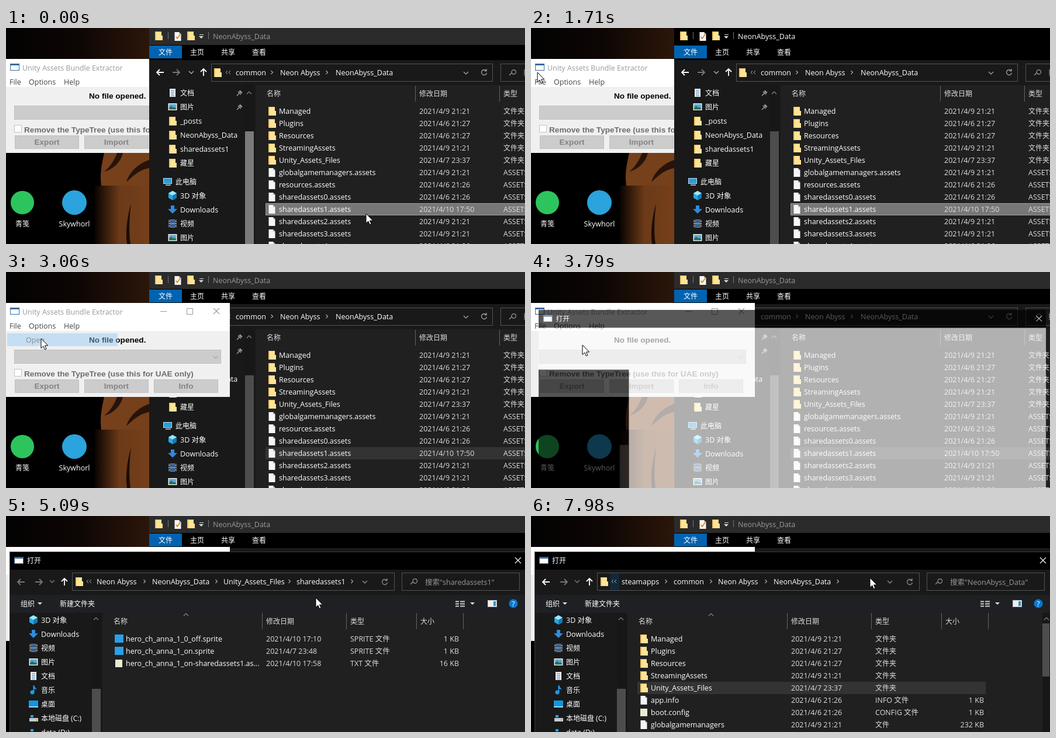
Animation of 888 by 370 pixels, one loop 8 s. Source, as an HTML page:

```html
<!DOCTYPE html>
<html lang="zh">
<head>
<meta charset="utf-8">
<title>Opening an asset folder</title>
<style>
html, body { margin: 0; width: 100%; height: 100%; overflow: hidden; background: #000; }
svg { display: block; width: 100%; height: 100%; }
text { font: 12.5px "Open Sans", "Noto Sans CJK SC", "Noto Sans CJK", sans-serif; white-space: pre; }
.han { font-size: 12px; }
.bold { font: bold 13.6px "Liberation Sans", sans-serif; }
.line { fill: none; stroke: currentColor; }
</style>
</head>
<body>
<svg id="stage" viewBox="0 0 888 370" preserveAspectRatio="xMinYMin meet"></svg>
<script>
const rect = (x, y, w, h, fill, more = '') =>
  `<rect x="${x}" y="${y}" width="${w}" height="${h}" fill="${fill}" ${more}/>`;
const frame = (x, y, w, h, fill, stroke) => rect(x + .5, y + .5, w - 1, h - 1, fill, `stroke="${stroke}"`);
const text = (x, y, s, fill = '#fff', more = '') =>
  `<text x="${x}" y="${y + 4.5}" fill="${fill}" ${/^[\u4e00-\u9fff]/.test(s) ? 'class="han"' : ''} ${more}>${s}</text>`;
const middle = 'text-anchor="middle"', end = 'text-anchor="end"';
const icon = (id, x, y, color = '#fff') => `<use href="#${id}" x="${x}" y="${y}" color="${color}"/>`;
const group = (id, body, more = '') => `<g id="${id}" ${more}>${body}</g>`;
const def = (id, body) => group(id, body);
const stroke = (d, w = 1.2) => `<path class="line" stroke-width="${w}" d="${d}"/>`;
const shape = (d, fill) => `<path fill="${fill}" d="${d}"/>`;

const defs = `<defs>
  <linearGradient id="glow"><stop offset="0" stop-color="#030202"/><stop offset=".5" stop-color="#0d0604"/><stop offset="1" stop-color="#2c160a"/></linearGradient>
  <linearGradient id="ember"><stop offset="0" stop-color="#080402"/><stop offset=".15" stop-color="#2a1509"/><stop offset=".45" stop-color="#6b3a18"/><stop offset="1" stop-color="#753f1a"/></linearGradient>
  <clipPath id="leftPart"><rect width="245" height="370"/></clipPath>
  <clipPath id="field"><rect x="114" y="97" width="466" height="31"/></clipPath>` +
  def('folder', shape('M-6-7H5V0H7V8H-6z', '#f0c560') + shape('M-4-6H5V0H7V8H-4z', '#ffe397')) +
  def('page', shape('M-5.5-7H2L5.5-3.5V8h-11z', '#f5f5f5') + shape('M2-7v3.5h3.5z', '#aaa')) +
  def('doc', shape('M-5-7H5V7H-5z', '#eee') + `<g color="#3a87c4">${stroke('M-3-4H3M-3-1H3M-3 2H3M-3 5H3')}</g>`) +
  def('note', rect(-6, -6, 12, 13, '#e9ecd2')) +
  def('tile', rect(-7, -7, 15, 14, '#2b9fe6')) +
  def('picture', rect(-7.5, -6, 15, 12, '#eee') + rect(-6, -4.5, 12, 9, '#56a9dc') + shape('M-6 4.5v-3l4-3 3 3 2-1 3 2v2z', '#2c6d50')) +
  def('cube', shape('M0-8L7-4V4L0 8-7 4v-8z', '#29a9dd') + shape('M0-8L7-4 0 0-7-4z', '#9be6fa') + shape('M0 0L7-4V4L0 8z', '#1678b5')) +
  def('down', shape('M-3-7h6v6h5L0 7-8-1h5z', '#2d8ae0')) +
  def('film', rect(-7, -7, 14, 14, '#888') + rect(-4, -6, 8, 5, '#345f91') + rect(-4, 1, 8, 5, '#345f91') +
    '<path d="M-5.5-7V7M5.5-7V7" stroke="#222" stroke-width="2" stroke-dasharray="2"/>') +
  def('music', '<circle cx="-2" cy="4" r="3.5" fill="#1e9be8"/>' + shape('M-.5-8h2c0 4 4 4 4 9-1-3-3-3-4-3V4h-2z', '#1e9be8')) +
  def('desk', rect(-8, -6, 16, 12, '#1296e0') + rect(-8, 4, 16, 2, '#9cd8f8')) +
  def('drive', rect(-7, 0, 15, 6, '#c9c9c9') + rect(-5, -5, 5, 4, '#25a5e8') + rect(4, 3, 2, 1, '#2c2')) +
  def('pc', rect(-8, -6, 15, 10, '#bcdcec') + rect(-7, -5, 13, 8, '#2c9bd8') + rect(-4, 5, 9, 2, '#aaa')) +
  def('app', rect(-8, -6, 16, 12, '#3b6a9d') + rect(-7, -3, 14, 8, '#fff')) +
  def('check', icon('page', 0, 0) + `<g color="#e08a18">${stroke('M-3 1L-1 4 4-3', 1.8)}</g>`) +
  def('back', stroke('M6 0H-6M-1-5L-6 0-1 5', 1.8)) +
  def('forward', stroke('M-6 0H6M1-5L6 0 1 5', 1.8)) +
  def('up', stroke('M0 6V-5M-5-1L0-6 5-1', 1.8)) +
  def('chevron', stroke('M-1.5-3L1.5 0-1.5 3')) +
  def('more', stroke('M-1-3L-4 0-1 3M4-3L1 0 4 3', 1)) +
  def('drop', stroke('M-4-2L0 2 4-2', 1.5)) +
  def('rise', stroke('M-4 2L0-2 4 2')) +
  def('triangle', shape('M-4-2H4L0 2z', '#ddd')) +
  def('reload', stroke('M3.5-3A4.5 4.5 0 1 0 4.5 1M4-6v3.5H.5', 1.4)) +
  def('lens', stroke('M-1 1L-5 5M-1-1A3.8 3.8 0 1 1 0 2 3.8 3.8 0 0 1-1-1')) +
  def('pin', stroke('M-5 5L-1 1M-3-2L2 3M-1-3L3 1M0-4L4 0', 1.6)) +
  def('close', stroke('M-5-5L5 5M5-5L-5 5', 1.1)) + '</defs>';

const desktop = rect(0, 0, 888, 370, '#000') + rect(0, 0, 245, 54, 'url(#glow)') +
  shape('M163 270C160 250 164 232 168 214H245V270z', '#75401a') +
  shape('M190 214C184 230 176 240 168 246 184 242 196 230 200 214zM245 226C226 232 210 248 206 264 220 250 232 242 245 240z', '#27130a') +
  rect(152, 270, 93, 100, 'url(#ember)') +
  shape('M207 370C204 350 207 325 214 300 211 325 210 350 213 370z', '#1c0d06') +
  '<circle cx="28" cy="299" r="20" fill="#2dc45e"/><circle cx="117" cy="299" r="21" fill="#2ba3dc"/>' +
  text(28, 335, '青笺', '#fff', middle) + text(117, 335, 'Skywhorl', '#fff', middle);

const rowTop = i => 132 + 21 * i;
const folders = [['Managed', '9 21:21'], ['Plugins', '6 21:27'], ['Resources', '6 21:27'],
  ['StreamingAssets', '9 21:21'], ['Unity_Assets_Files', '7 23:37']];
const assets = [['globalgamemanagers', '9 21:21'], ['resources', '6 21:26'], ['sharedassets0', '6 21:26'],
  ['sharedassets1', '10 17:50'], ['sharedassets2', '9 21:21'], ['sharedassets3', '9 21:21'], ['sharedassets4', '6 21:26']];
const explorerRows = [
  ...folders.map(([name, day]) => ['folder', name, day, '文件夹']),
  ...assets.map(([name, day]) => ['page', name + '.assets', day, 'ASSETS 文件'])
].map(([kind, name, day, type], i) => {
  const y = 142 + 21 * i;
  return icon(kind, 455, y) + text(467, y, name) + text(707, y, '2021/4/' + day, '#ddd') + text(851, y, type, '#ddd');
}).join('');

const places = ['cube|3D 对象', 'down|Downloads', 'film|视频', 'picture|图片', 'doc|文档', 'music|音乐',
  'desk|桌面', 'drive|本地磁盘 (C:)', 'drive|data (D:)'].map(s => s.split('|'));
const tree = (list, x, y0) => list.map(([kind, name], i) =>
  icon(kind, x, y0 + 24 * i) + text(x + 13, y0 + 24 * i, name)).join('');
const quick = [['doc', '文档'], ['picture', '图片'], ['folder', '_posts'], ['folder', 'NeonAbyss_Data'],
  ['folder', 'sharedassets1'], ['folder', '藏星']];

const crumbs = (y, list) => list.map(([x, name, arrow]) =>
  text(x, y, name) + (arrow ? icon('chevron', arrow, y, '#aaa') : '')).join('');

const explorer = rect(245, 0, 643, 370, '#191919') + rect(245, 0, 643, 29, '#2b2b2b', 'id="caption"') +
  icon('folder', 261, 13) + rect(277, 7, 1, 12, '#777') + icon('check', 294, 14) + icon('folder', 316, 13) +
  icon('triangle', 334, 16) + rect(331, 11, 7, 1, '#ddd') + rect(346, 7, 1, 12, '#777') +
  text(354, 14, 'NeonAbyss_Data', '#999', 'id="captionText"') +
  rect(245, 29, 643, 26, '#000') + rect(245, 30, 56, 22, '#0063b1') +
  text(261, 41, '文件') + text(315, 41, '主页') + text(368, 41, '共享') + text(421, 41, '查看') +
  icon('back', 264, 76) + icon('forward', 291, 76, '#777') + icon('drop', 317, 76, '#aaa') + icon('up', 338, 76) +
  frame(351, 61, 482, 31, '#191919', '#535353') +
  icon('folder', 362, 76) + icon('more', 380, 76, '#aaa') +
  crumbs(76, [[393, 'common', 455], [469, 'Neon Abyss', 549], [564, 'NeonAbyss_Data']]) +
  icon('drop', 787, 77, '#999') + icon('reload', 818, 76, '#999') +
  frame(846, 61, 60, 31, '#191919', '#535353') + icon('lens', 866, 76, '#999') + text(885, 76, '搜', '#999') +
  tree(quick, 285, 111) + icon('pin', 400, 111, '#999') + icon('pin', 400, 135, '#999') +
  icon('pc', 277, 263) + text(290, 263, '此电脑') + tree(places.slice(0, 4), 285, 287) +
  rect(408, 98, 17, 272, '#171717') + icon('rise', 416, 111, '#888') +
  rect(409, 177, 15, 193, '#4d4d4d') + rect(409, 177, 15, 193, '#7a7a7a', 'id="thumbGlow"') +
  rect(427, 98, 461, 272, '#202020') + text(446, 112, '名称', '#ddd') + text(707, 112, '修改日期', '#ddd') +
  text(851, 112, '类型', '#ddd') + rect(700, 99, 1, 27, '#636363') + rect(844, 99, 1, 27, '#636363') +
  rect(444, 0, 444, 21, '#4d4d4d', 'id="hover"') +
  rect(444.5, 300.5, 450, 20, '#777', 'id="selected"') + explorerRows;

const button = (x, name) => frame(x, 184, 110, 23, '#ccc', '#bfbfbf') + text(x + 55, 195, name, '#838383', `class="bold" ${middle}`);
const extractor = rect(0, 53, 383, 161, '#f0f0f0') + rect(0, 53, 383, 48, '#fff') +
  icon('app', 15, 67) + text(28, 68, 'Unity Assets Bundle Extractor', '#999', 'id="appTitle"') +
  group('appButtons', stroke('M264 67.5h11M309.5 62.5h10v10h-10z', 1) + icon('close', 360, 67, 'currentColor')) +
  rect(2, 83, 28, 18, '#cce8ff', 'id="fileMark"') +
  text(6, 92, 'File', '#444') + text(39, 92, 'Options', '#444') + text(99, 92, 'Help', '#444') +
  text(142, 116, 'No file opened.', '#000', 'class="bold"') +
  frame(14, 133, 354, 24, '#ccc', '#bfbfbf') + icon('drop', 359, 146, '#aaa') +
  frame(14, 166, 13, 13, '#fff', '#c4c4c4') +
  text(31, 174, 'Remove the TypeTree (use this for UAE only)', '#6d6d6d', 'class="bold"') +
  button(15, 'Export') + button(134, 'Import') + button(253, 'Info');

const commands = ['Save', 'Close', 'Load Package file', 'Create Package file', 'Create Installer', 'Exit'];
const menu = group('menu', frame(0, 102, 193, 160, '#f2f2f2', '#ccc') + text(34, 116, 'Open', '#111') +
  commands.map((name, i) => text(34, 138 + 22 * i, name, '#111')).join('')) +
  group('openItem', rect(2, 105, 189, 22, '#91c9f7') + text(34, 116, 'Open', '#111'));

const fileRow = ([kind, name, day, type, size], i) => {
  const y = 210 + 21 * i;
  return icon(kind, 193, y) + text(205, y, name) + text(445, y, '2021/4/' + day, '#ddd') +
    text(589, y, type, '#ddd') + (size ? text(775, y, size + ' KB', '#ddd', end) : '');
};
const sprites = [['tile', 'hero_ch_anna_1_0_off.sprite', '10 17:10', 'SPRITE 文件', 1],
  ['tile', 'hero_ch_anna_1_on.sprite', '7 23:48', 'SPRITE 文件', 1],
  ['note', 'hero_ch_anna_1_on-sharedassets1.as...', '10 17:58', 'TXT 文件', 16]];
const dataRows = [...folders.map(([name, day]) => ['folder', name, day, '文件夹']),
  ['page', 'app.info', '6 21:26', 'INFO 文件', 1], ['note', 'boot.config', '6 21:26', 'CONFIG 文件', 1],
  ['page', 'globalgamemanagers', '9 21:21', '文件', 232]];
const dataPath = 'G:\\Steam\\steamapps\\common\\Neon Abyss\\NeonAbyss_Data';

const titleBar = rect(6, 61, 882, 31, '#000') + icon('app', 22, 76) + text(36, 76, '打开') + icon('close', 876, 76);
const ghost = group('ghost', rect(6, 92, 882, 400, '#fff') + rect(6, 165, 157, 330, '#000') +
  rect(147, 296, 15, 200, '#333') + titleBar);

const dialog = group('dialog', rect(6, 61, 882, 309, '#191919') + titleBar +
  icon('back', 26, 113, '#777') + group('backReady', icon('back', 26, 113)) + icon('forward', 56, 113, '#777') +
  icon('drop', 79, 112, '#777') + icon('up', 100, 113) +
  rect(7, 135, 881, 31, '#1f2023') + frame(824, 144, 16, 12, '#eee', '#bbb') + rect(834, 146, 4, 8, '#2c91d4') +
  '<circle cx="868" cy="150" r="7.5" fill="#0a78d0"/>' + text(868, 150, '?', '#fff', 'text-anchor="middle" font-weight="bold"') +
  rect(165, 166, 723, 204, '#202020') + icon('rise', 308, 169, '#888') +
  text(184, 180, '名称', '#ddd') + text(445, 180, '修改日期', '#ddd') + text(589, 180, '类型', '#ddd') + text(709, 180, '大小', '#ddd') +
  [438, 582, 702, 782].map(x => rect(x, 166, 1, 28, '#636363')).join('') +
  group('shift', tree(places, 47, 178) +
    group('pendingRows', sprites.map(([, ...r], i) => fileRow(['page', ...r], i)).join('')) +
    group('spriteRows', sprites.map(fileRow).join('')) +
    group('dataRows', rect(182, 284, 596, 21, '#333') + dataRows.map(fileRow).join('') +
      rect(875, 166, 13, 204, '#171717') + icon('rise', 882, 176, '#888') + rect(875, 184, 12, 91, '#4d4d4d'))) +
  rect(147, 166, 16, 204, '#171717') + icon('rise', 154, 176, '#888') + rect(147, 296, 15, 74, '#4d4d4d') +
  group('pending', rect(114, 97, 550, 31, '#fff') + rect(676, 93, 204, 37, '#fff') +
    rect(670, 111, 6, 1, '#fff') + rect(884, 111, 4, 1, '#fff')) +
  group('loaded', text(25, 150, '组织') + icon('triangle', 58, 150) + text(92, 150, '新建文件夹') +
    `<g color="#ccc">${stroke('M769 146.5h6M769 150.5h6M769 154.5h6M777 146.5h8M777 150.5h8M777 154.5h8', 2)}</g>` +
    icon('triangle', 798, 150) +
    frame(113, 97, 552, 31, '#191919', '#535353') + frame(677, 97, 202, 31, '#191919', '#535353') +
    icon('lens', 697, 112, '#999') + text(717, 113, '', '#999', 'id="search"') +
    rect(578, 98, 19, 29, '#333', 'id="dropMark"') +
    icon('drop', 614, 113, '#888') + icon('reload', 648, 113, '#888') + icon('folder', 125, 112) +
    rect(0, 98, 0, 29, '#16384d', 'id="crumbMark"') + rect(135, 98, 16, 29, '#10283a', 'id="moreMark"') +
    group('spriteCrumbs', icon('more', 142, 112, '#aaa') + crumbs(112, [[155, 'Neon Abyss', 237],
      [250, 'NeonAbyss_Data', 360], [372, 'Unity_Assets_Files', 485], [497, 'sharedassets1', 592]])) +
    group('dataCrumbs', icon('more', 142, 112, '#aaa') + crumbs(112, [[155, 'steamapps', 231],
      [244, 'common', 308], [320, 'Neon Abyss', 402], [415, 'NeonAbyss_Data', 525]])) +
    group('edit', rect(138, 104, 357, 17, '#0078d7', 'id="marked"') +
      text(138, 112, '', '#fff', 'id="path"') + rect(494, 104, 1, 17, '#fff', 'id="caret"') +
      rect(576, 98, 3, 29, '#191919') + frame(114, 97, 466, 31, 'none', '#bbb'), 'clip-path="url(#field)"')) +
  frame(6, 61, 890, 320, 'none', '#3a3a3a'));

const pointer = group('pointer', '<path d="M0 0V16.5L3.8 13 6.4 18.8 9 17.6 6.5 12H11.8Z" fill="#fff" stroke="#000"/>');

document.getElementById('stage').innerHTML = defs + desktop + explorer +
  group('extractor', extractor) + menu + ghost + dialog + pointer;

const parts = {};
document.querySelectorAll('#stage [id]').forEach(node => parts[node.id] = node);
const show = (id, on) => parts[id].style.display = on ? '' : 'none';
const set = (id, values) => { for (const k in values) parts[id].setAttribute(k, values[k]); };
const write = (id, s) => { if (parts[id].textContent !== s) parts[id].textContent = s; };
const clamp = v => Math.min(1, Math.max(0, v));
const span = (t, a, b) => clamp((t - a) / (b - a));

// time, x, y
const route = [[0, 616, 318], [50, 616, 318], [400, 608, 345], [790, 600, 343], [920, 600, 343], [1710, 11, 76],
  [1760, 11, 76], [2060, 14, 89], [2270, 14, 89], [2680, 60, 114], [3420, 60, 114], [3660, 88, 125], [4500, 88, 125],
  [4760, 340, 180], [5000, 594, 150], [5290, 320, 108], [5330, 320, 108], [5600, 215, 108], [5890, 215, 108],
  [6070, 577, 112], [6220, 577, 112], [6300, 580, 106], [8000, 580, 106]];
function locate(t) {
  const i = Math.max(1, route.findIndex(p => p[0] > t));
  const [a, b] = [route[i - 1], route[i]];
  const p = span(t, a[0], b[0]), e = p * p * (3 - 2 * p);
  return [a[1] + (b[1] - a[1]) * e, a[2] + (b[2] - a[2]) * e];
}
const crumbEdges = [152, 247, 369, 494];

function render(t) {
  const [x, y] = locate(t);
  set('pointer', { transform: `translate(${Math.round(x)} ${Math.round(y)})` });

  const active = t >= 50 && t < 1780, raised = t >= 1780, appActive = raised && t < 2900;
  set('caption', { fill: active ? '#000' : '#2b2b2b' });
  set('captionText', { fill: active ? '#fff' : '#999' });
  set('thumbGlow', { opacity: 1 - span(t, 50, 300) });
  set('selected', { fill: raised ? '#333' : '#777', stroke: raised ? '#333' : '#9a9a9a' });
  show('hover', !raised && x > 444);
  set('hover', { y: rowTop(Math.floor((y - 132) / 21)) });
  set('extractor', { 'clip-path': raised ? 'none' : 'url(#leftPart)' });
  set('appTitle', { fill: appActive ? '#000' : '#999' });
  set('appButtons', { color: appActive ? '#000' : '#999' });

  show('fileMark', t >= 2000 && t < 2900);
  set('menu', { opacity: t < 2900 ? span(t, 2000, 2120) : 0 });
  set('openItem', { opacity: t > 2270 && y > 105 && t < 3200 ? 1 - span(t, 2900, 3190) : 0 });

  const p = span(t, 3700, 3840), scale = .955 + .045 * p;
  show('ghost', t > 3700 && t < 3900);
  set('ghost', { opacity: p, transform: `translate(448 311) scale(${scale}) translate(-448 -311)` });
  const loaded = t >= 4130, editing = t >= 6250 && t < 7740, moved = t >= 7740;
  show('dialog', t >= 3900);
  show('pending', !loaded);
  show('loaded', loaded);
  set('shift', { transform: `translate(0 ${loaded ? 0 : -1})` });
  show('pendingRows', !loaded);
  show('spriteRows', loaded && !moved);
  show('dataRows', t >= 7820);
  show('backReady', moved);
  write('search', `搜索"${moved ? 'NeonAbyss_Data' : 'sharedassets1'}"`);
  show('spriteCrumbs', !editing && !moved);
  show('dataCrumbs', moved);
  show('moreMark', t >= 7900);

  const crumb = crumbEdges.findIndex((left, i) => x >= left && x < crumbEdges[i + 1]);
  const hovering = t >= 5310 && t < 6100 && crumb >= 0;
  show('crumbMark', hovering);
  if (hovering) set('crumbMark', { x: crumbEdges[crumb], width: crumbEdges[crumb + 1] - crumbEdges[crumb] });

  const pasted = t >= 6590;
  show('edit', editing);
  set('dropMark', { opacity: editing ? 1 - span(t, 6250, 6590) : 0 });
  write('path', dataPath.concat(pasted ? '' : '\\Unity_Assets_Files\\sharedassets1'));
  const whole = t >= 6420 && !pasted;
  set('marked', { width: whole ? 437 : 357 });
  show('marked', whole || t >= 7330);
  show('caret', pasted && t < 7150);
}

const start = performance.now();
function tick() {
  render((performance.now() - start) % 8000);
  requestAnimationFrame(tick);
}
tick();
</script>
</body>
</html>
```
